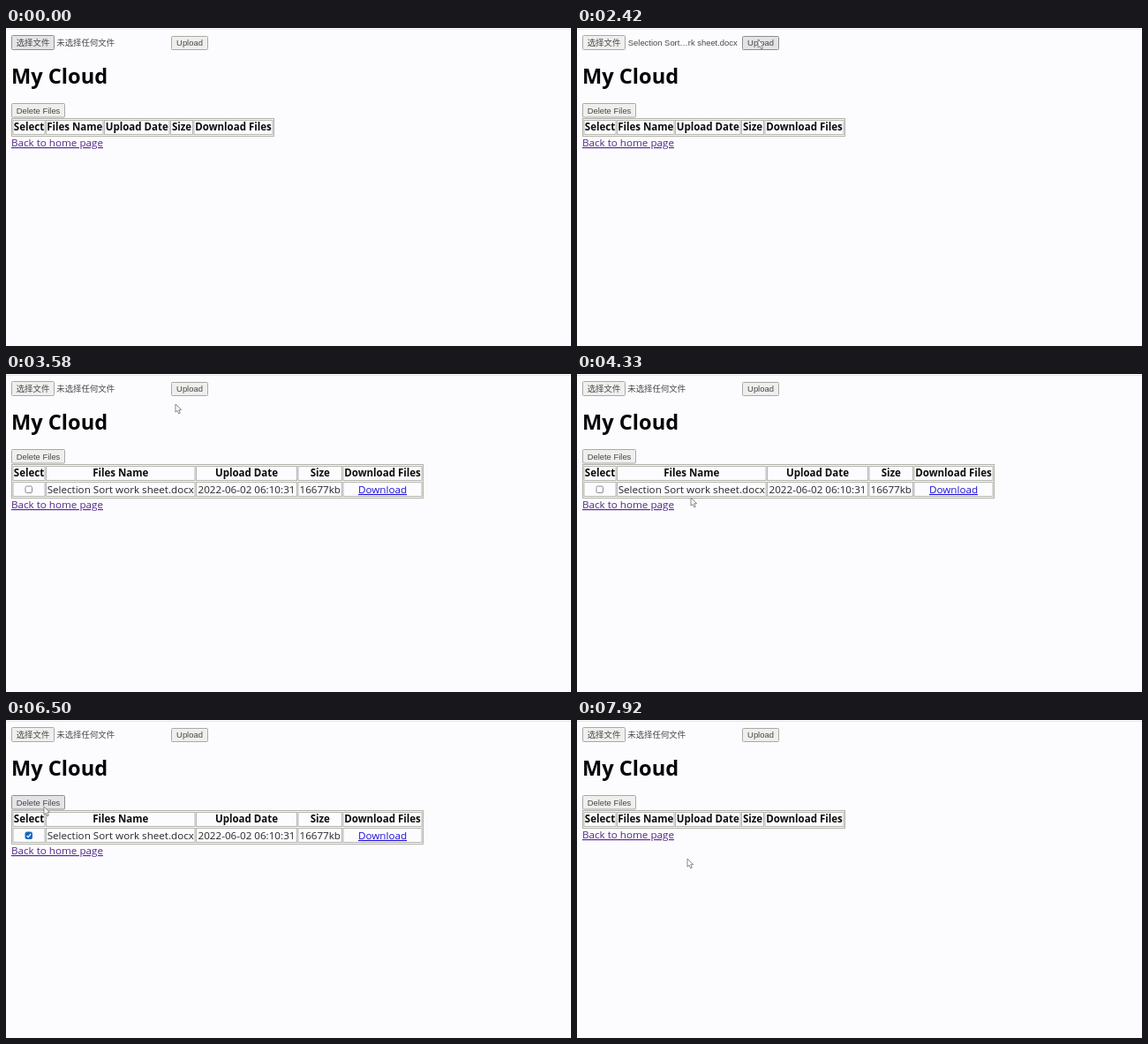
An HTML page for the animation above (8000 ms loop, 640 px wide and 360 px high).

```html
<!DOCTYPE html>
<html lang="en">
<head>
<meta charset="utf-8">
<title>My Cloud</title>
<style>
  html, body { margin: 0; width: 100%; height: 100%; overflow: hidden; background: #fcfcff; }
  svg { display: block; width: 640px; height: 360px; }
  text { font: 11.65px "Open Sans", "Noto Sans", sans-serif; fill: #262626; }
  .title { font-size: 23.6px; font-weight: 700; fill: #040404; }
  .head { font-size: 11.5px; font-weight: 700; fill: #0c0c0c; }
  .mid { text-anchor: middle; }
  .ui { font: 9.42px "Liberation Sans", Arial, "Noto Sans CJK SC", "Noto Sans CJK", sans-serif; fill: #484846; }
  .link { text-decoration: underline; fill: #55288a; }
  .new { fill: #2010d8; }
  .button { fill: #efefee; stroke: #a9a9a6; }
  .hover { fill: #e3e3e8; stroke: #8e8e92; }
  .table { fill: #f7f7f5; stroke: #b2b2aa; }
  .cell { fill: #fcfcff; stroke: #b6b6b0; }
  .top { stroke: #e6e6e8; }
</style>
</head>
<body>
<svg id="stage" viewBox="0 0 640 360"></svg>
<script>
const LOOP = 8000, TICK = 1000 / 12;
const PICKED = 80, UPLOADED = 3000, CHECKED = 5500, DELETED = 6920;
const TOP = 102.5, ROW = 18, GAP = 1.5;
const stage = document.getElementById("stage");

function add(parent, tag, attrs, content = "") {
  const el = document.createElementNS("http://www.w3.org/2000/svg", tag);
  for (const key in attrs) el.setAttribute(key, attrs[key]);
  el.textContent = content;
  return parent.appendChild(el);
}
const label = (parent, x, y, content, cls) => add(parent, "text", { x, y, class: cls }, content);
const box = (parent, x, y, width, height, cls, rx = 0) =>
  add(parent, "rect", { x, y, width, height, rx, class: cls });

function button(x, y, width, height, content) {
  const face = box(stage, x, y, width, height, "button", 1);
  label(stage, x + width / 2, y + height - 4.5, content, "ui mid");
  return face;
}

function table(widths, ...rows) {
  const g = add(stage, "g", {});
  const width = widths.reduce((sum, w) => sum + w + GAP, GAP);
  const height = rows.length * ROW + 2;
  box(g, 6.5, TOP, width, height, "table");
  rows.forEach((row, r) => {
    let x = 6.5 + GAP;
    const y = TOP + 2 + r * ROW;
    row.forEach((content, c) => {
      box(g, x, y, widths[c], ROW - 2, "cell");
      const cls = r === 0 ? "head" : content === "Download" ? "link new" : "";
      label(g, x + widths[c] / 2, y + 11.7 + r * 0.7, content, "mid " + cls);
      x += widths[c] + GAP;
    });
  });
  label(g, 6, TOP + height + 11.5, "Back to home page", "link");
  return g;
}

add(stage, "path", { d: "M0 1.5H640", class: "top" });
const choose = button(6.5, 8.5, 48, 16, "选择文件");
const upload = button(187.5, 9.5, 41, 15, "Upload");
const remove = button(6.5, 85.5, 60, 15.5, "Delete Files");
const noFile = label(stage, 57.3, 20, "未选择任何文件", "ui");
const fileName = label(stage, 57.8, 20, "Selection Sort…rk sheet.docx", "ui");
label(stage, 6, 63.4, "My Cloud", "title");

const heads = ["Select", "Files Name", "Upload Date", "Size", "Download Files"];
const file = ["", "Selection Sort work sheet.docx", "2022-06-02 06:10:31", "16677kb", "Download"];
const empty = table([36, 64.5, 73.5, 25, 89], heads);
const filled = table([36, 168.5, 114, 49.5, 89], heads, file);
const check = box(filled, 22, 127, 7.5, 7.5, "", 1.5);
const tick = add(filled, "path", { d: "M23.6 130.9l1.6 1.7 2.9-3.6", fill: "none", stroke: "#fff", "stroke-width": 1.2 });

const cursor = add(stage, "path", {
  d: "M0 0V9.2L2.1 7.3 3.7 10.9 5.3 10.2 3.8 6.7H6.6Z",
  fill: "#fff", stroke: "#7c7c7c", "stroke-width": 0.9
});

// each glide of the pointer: start, end, x, y reached
const glides = [
  [1000, 1416, 195, 23], [1416, 1750, 205, 13],
  [3330, 4330, 129, 140], [4330, 5250, 27, 131],
  [6170, 6500, 43, 98], [6500, 6750, 47, 91],
  [7170, 7900, 125, 157]
];
const smooth = k => k * k * (3 - 2 * k);

function pointer(t) {
  let x = 608, y = 315;
  for (const [from, to, toX, toY] of glides) {
    const k = smooth(Math.min(1, Math.max(0, (t - from) / (to - from))));
    x += (toX - x) * k;
    y += (toY - y) * k;
  }
  return [x, y];
}

const show = (el, on) => el.setAttribute("visibility", on ? "inherit" : "hidden");
const hover = (el, on) => el.classList.toggle("hover", on);

function draw(now) {
  const t = Math.floor((now % LOOP + 4) / TICK) * TICK + 4;
  const picked = t >= PICKED && t < UPLOADED;
  const hasRow = t >= UPLOADED && t < DELETED;
  const checked = t >= CHECKED;

  show(noFile, !picked);
  show(fileName, picked);
  show(empty, !hasRow);
  show(filled, hasRow);
  show(tick, hasRow && checked);
  check.setAttribute("fill", checked ? "#1268c0" : "#fff");
  check.setAttribute("stroke", checked ? "#1268c0" : "#8a8a8a");
  hover(choose, t < PICKED);
  hover(upload, t >= 1500 && t < 3500);
  hover(remove, t >= 6450 && t < 7300);
  show(cursor, t >= 1000);
  cursor.setAttribute("transform", `translate(${pointer(t).map(Math.round)})`);
}

function frame() {
  draw(performance.now());
  requestAnimationFrame(frame);
}
frame();
</script>
</body>
</html>
```
